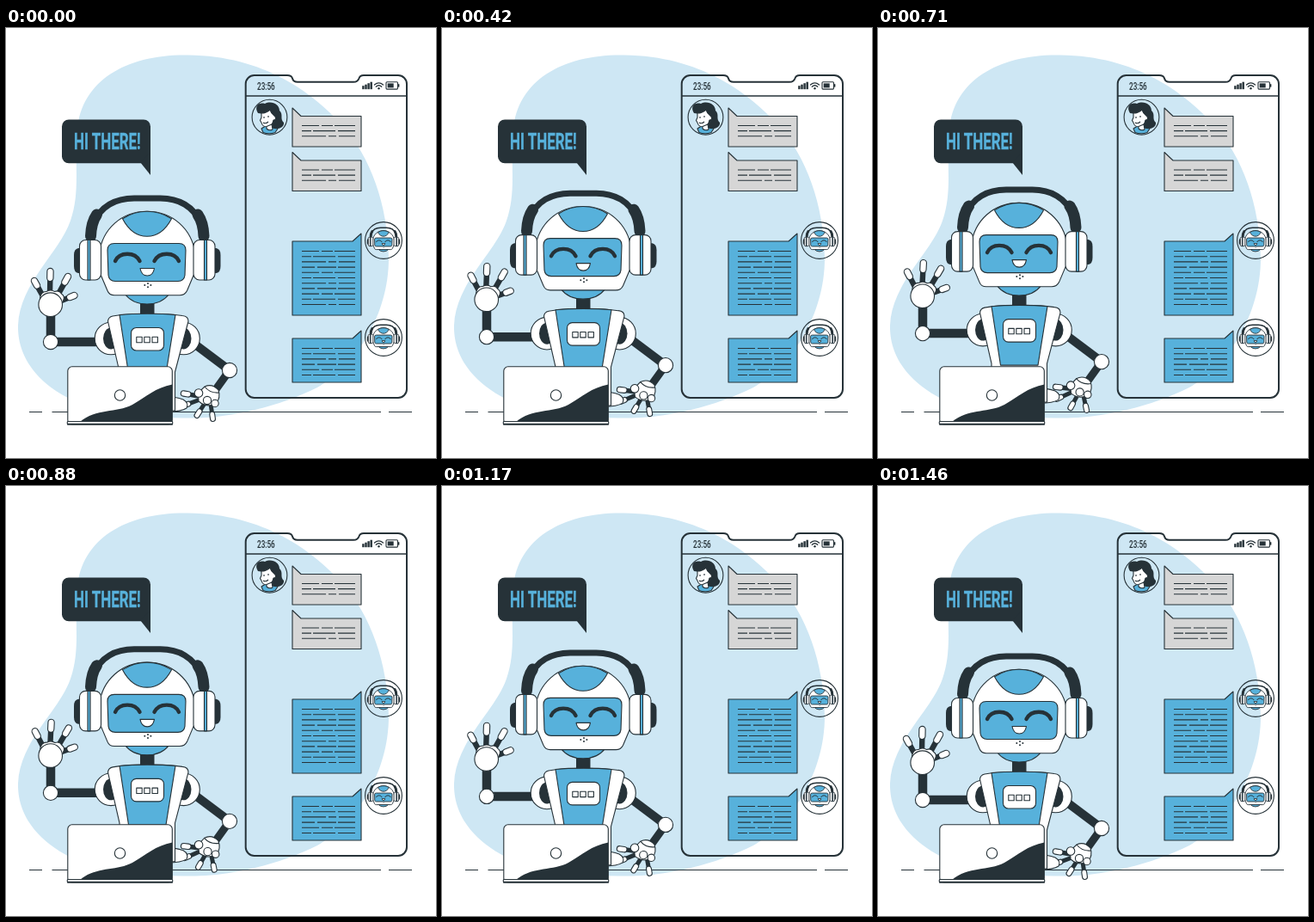
These frames come from a looping animation (500 px wide and 500 px high, 1500 ms). An HTML page:

```html
<!DOCTYPE html>
<html lang="en">
<head>
<meta charset="utf-8">
<title>Chat robot</title>
<style>
html, body { margin: 0; width: 100%; height: 100%; overflow: hidden; background: #fff; }
svg { display: block; width: 100vw; height: 100vh; --w: 1.1; }
.w, .b, .g, .n { stroke: #263238; stroke-width: var(--w); stroke-linejoin: round; }
.w { fill: #fff; }
.b { fill: #57b1db; }
.g { fill: #d6d6d6; }
.n { fill: none; }
.d { fill: #263238; }
.s { fill: none; stroke: #263238; stroke-linecap: round; }
text { font-family: Roboto, "Liberation Sans", sans-serif; }
</style>
</head>
<body>
<svg id="stage" viewBox="0 0 500 500"></svg>
<script>
const DARK = '#263238';
const LOOP = 1500, STEPS = 36, RISE = 10.2;
const NARROW = 0.64;

const path = (cls, d, more = '') => `<path class="${cls}" d="${d}" ${more}/>`;
const circle = (cls, x, y, r) => `<circle class="${cls}" cx="${x}" cy="${y}" r="${r}"/>`;
const box = (cls, x, y, w, h, r = 0) =>
  `<rect class="${cls}" x="${x}" y="${y}" width="${w}" height="${h}" rx="${r}"/>`;
const bar = (x1, y1, x2, y2, w, color = DARK, cap = 'round') =>
  `<path d="M${x1} ${y1}L${x2} ${y2}" stroke="${color}" stroke-width="${w}" stroke-linecap="${cap}"/>`;
const capsule = (x1, y1, x2, y2, w) => bar(x1, y1, x2, y2, w) + bar(x1, y1, x2, y2, w - 2.2, '#fff');
const mirror = part => part + `<g transform="translate(328.5 0) scale(-1 1)">${part}</g>`;
const label = (str, x, y, size, attrs) =>
  `<text transform="translate(${x} ${y}) scale(${NARROW} 1)" font-size="${size}" ${attrs}>${str}</text>`;

// dark stalk from the knuckle, white tip on its far part
function finger(x1, y1, x2, y2, w = 8.4, split = 0.7) {
  const mx = x1 + (x2 - x1) * split, my = y1 + (y2 - y1) * split;
  return bar(x1, y1, mx, my, w - 2) + capsule(mx, my, x2, y2, w);
}

function textLines(y, count, gap = 6.2) {
  const dashes = ['20 3 13 2 24', '11 2 26 3 20', '28 3 9 3 19', '15 3 22 2 20'];
  let out = '';
  for (let i = 0; i < count; i++) {
    out += path('n', `M344 ${(y + i * gap).toFixed(1)}H406`, `stroke-dasharray="${dashes[i % 4]} 9"`);
  }
  return out;
}

const userBubble = y =>
  path('g', `M333 ${y}L343 ${y + 9.5}H413V${y + 45}H333Z`) + textLines(y + 20.5, 3, 6.1);
const botBubble = (y, h, count) =>
  path('b', `M413 ${y}L403 ${y + 9}H333V${y + h}H413Z`) + textLines(y + 20.5, count);

function head() {
  const ear =
    path('s', 'M98.500 242C99 230 102 222 105.500 217', 'stroke-width="13"') +
    path('d', 'M88 256H84Q79 257 79 264V277Q79 284 84 285H88Z') +
    box('w', 85.5, 246.5, 25, 46.5, 7) +
    path('b', 'M95 246.500H98V293H95Z');
  return path('b', 'M138 309Q147 321 164 321Q181 321 190 309Z') +
    path('s', 'M102 228C109 207 128 198 149 198H179.500C200 198 219 207 226.500 228', 'stroke-width="7"') +
    path('w', 'M164 213.300C134 213.300 112 234 108.500 262Q107 275 108.500 283L118 305.500Q120 310.700 126 310.700H202Q208 310.700 210.500 305.500L220 283Q221.500 275 220 262C216 234 194 213.300 164 213.300Z') +
    path('b', 'M135.500 221.800C145 215.800 154 213.300 164 213.300C174 213.300 183 215.800 192.500 221.800C185 236 175 242.300 164 242.300C153 242.300 143 236 135.500 221.800Z') +
    path('b', 'M126 250.500H201Q209 250.500 209 258.500L208 287.500Q207 294.500 200 294.500H127Q120 294.500 119 287.500L118 258.500Q118 250.500 126 250.500Z') +
    path('s', 'M127 271C132 260 150 260 155.500 271M172.500 271C178 260 196 260 201 271', 'stroke-width="4.4"') +
    path('w', 'M156 279.500H172.500Q171 288 164.300 288Q157.500 288 156 279.500Z') +
    circle('d', 161.3, 299, 1) + circle('d', 165, 297.1, 1) +
    circle('d', 168.4, 299, 1) + circle('d', 165, 301.2, 1) +
    mirror(ear);
}

function torso() {
  const shoulder = circle('w', 122, 361, 18.8) +
    '<ellipse class="d" cx="122" cy="361" rx="9" ry="12.5"/>';
  const squares = [151.8, 160.8, 170].map(x => box('n', x, 359.3, 6.4, 6.4)).join('');
  return box('d', 156, 318, 16.5, 16) +
    path('w', 'M180 429Q195 428 206 432Q213 436 210 442Q203 447 180 446Z') +
    mirror(shoulder) +
    path('w', 'M118.500 341Q119 336 124 335C145 331.500 184 331.500 205 334.500Q212 335 212 341L196.500 400V445H132V400Z') +
    path('b', 'M132 333.600C150 331.800 179 331.800 197 333.600L186 402H142.500Z') +
    box('w', 145.5, 348.5, 38, 26.5, 6) + squares;
}

const leftArm = () =>
  bar(52, 365, 112, 365, 10.5, DARK, 'butt') + bar(52, 330, 52, 365, 10.5) +
  circle('w', 52, 365, 8.6) +
  '<g id="wave">' +
  finger(43, 312, 33, 294) + finger(51, 309, 51.5, 283) +
  finger(60, 311, 72, 289) + finger(62, 318, 79.5, 311) +
  path('w', 'M39.500 314Q41 306 47 306.500Q52 303.500 56.500 306.500Q62 304.500 64.500 309Q69 312 66.500 317L63 325H41Z') +
  circle('w', 51.7, 321.7, 13.8) +
  '</g>';

const rightArm = () =>
  bar(212, 362, 260, 398, 10) + bar(260, 398, 242, 423, 9) +
  circle('w', 260, 398, 8.6) +
  '<g id="rest">' +
  finger(224, 428, 206.5, 425, 7.5) + finger(223, 433, 207, 439, 7) +
  finger(232, 435, 222, 450.5, 7) + finger(238, 437, 240.5, 454.5, 7) +
  path('w', 'M231 417Q240 413 247 421Q250 430 244 437Q233 442 224 434Q222 424 231 417Z') +
  circle('w', 243, 436.5, 4.2) + circle('w', 224, 424.5, 4.8) +
  circle('w', 234, 433, 4.6) +
  path('n', 'M231 417Q237 425 248 424') +
  '</g>';

const laptop = () =>
  box('w', 71.8, 393.8, 121.5, 67, 5) +
  path('d', 'M86 458C105 442 128 448 147 438C163 429 174 418 193.300 414.500V458Z') +
  circle('w', 132.5, 427, 6.2) +
  box('w', 71.3, 457.5, 122.4, 3.4, 0.8) + bar(71, 460.6, 194, 460.6, 1.6, DARK, 'butt');

function woman() {
  return circle('n', 306.5, 103.7, 20.4) +
    path('b', 'M297 117Q306 110 316 117L313 121.500Q306 124 299 121.500Z') +
    path('d', 'M293 99C288 91 294 86 301 88C309 84 318 89 318 96C323 101 318 105 323 110C324 116 315 119 309 116L300 100Z') +
    path('w', 'M297 99C301 99 305 97 307 95C308 99 311 101 313 103Q315 107 311 107C310 112 307 115 304 115Q298 115 297 110L295.500 107.500L297 104Z') +
    path('n', 'M299 110Q302 112 305 109M300 103V105M305 102V104') +
    path('w', 'M303 114.500L309 112L310 118Q306 120 303 117Z');
}

const robotAvatar = y => circle('n', 439, y, 21.4) +
  `<g transform="translate(402 ${y - 59.3}) scale(.225)" style="--w:4">${head()}</g>`;

function statusIcons() {
  const signal = [4, 5.5, 7, 8.5].map((h, i) => box('d', 414.2 + i * 3.1, 71.2 - h, 2.4, h)).join('');
  return signal +
    path('s', 'M428.500 66Q433.500 61.700 438.500 66M430.300 68.200Q433.500 65.400 436.700 68.200', 'stroke-width="1.3"') +
    circle('d', 433.5, 70.3, 1.2) +
    box('n', 442, 62.7, 13.5, 8.4, 1) + box('d', 443.7, 64.4, 7, 5) + box('d', 455.8, 65.2, 1.6, 3.4);
}

const phone = () =>
  path('n', 'M288.700 55H327Q332 55 333 58.500Q334 62.800 339 62.800H404Q409 62.800 410.500 58.500Q411.500 55 416 55H456A10 10 0 0 1 466 65V420A10 10 0 0 1 456 430H288.700A10 10 0 0 1 278.700 420V65A10 10 0 0 1 288.700 55Z', 'style="--w:2"') +
  path('n', 'M279 79H466', 'style="--w:1.6"') +
  label('23:56', 292, 71.6, 12.8, `font-weight="500" fill="${DARK}"`) +
  statusIcons() + woman() +
  userBubble(93) + userBubble(144.5) +
  botBubble(239, 95, 11) + botBubble(352, 60, 6) +
  robotAvatar(247) + robotAvatar(360);

const speech = () =>
  box('d', 65, 106.5, 103, 50.8, 8) + path('d', 'M168 145V171L156 156Z') +
  label('HI THERE!', 79, 140.6, 26.5, 'font-weight="700" fill="#57b1db" stroke="#57b1db" stroke-width=".4"');

const backdrop = () =>
  '<path fill="#cee7f4" d="M212 31.500C142 30 88 60 83 118C79 156 87 190 75 224C62 262 16 296 14 346C13 398 60 432 112 445C148 453 182 453.500 220 453.500C262 453 318 440 362 418C405 394 445 335 445 268C444 205 424 150 390 112C356 75 300 32.500 212 31.500Z"/>' +
  path('n', 'M27 446.500H42M53.500 446.500H436M445 446.500H472');

const stage = document.getElementById('stage');
stage.innerHTML = backdrop() + speech() +
  `<g id="bot">${leftArm()}${rightArm()}${torso()}${head()}</g>` + laptop() + phone();

const [bot, wave, rest] = ['bot', 'wave', 'rest'].map(id => document.getElementById(id));

// 24 poses per second: a steady rise, then a steady fall
function draw(ms) {
  const step = Math.floor(((ms % LOOP) + 2) * STEPS / LOOP) % STEPS;
  const half = (STEPS - 1) / 2;
  const lift = 1 - Math.abs(step - half) / half;
  bot.setAttribute('transform', `translate(0 ${(-RISE * lift).toFixed(2)})`);
  wave.setAttribute('transform', `rotate(${(2 * lift).toFixed(2)} 52 322)`);
  rest.setAttribute('transform', `rotate(${(-4 * lift).toFixed(2)} 240 424)`);
}

let start;
function tick(now) {
  if (start === undefined) start = now;
  draw(now - start);
  requestAnimationFrame(tick);
}
draw(0);
requestAnimationFrame(tick);
</script>
</body>
</html>
```
